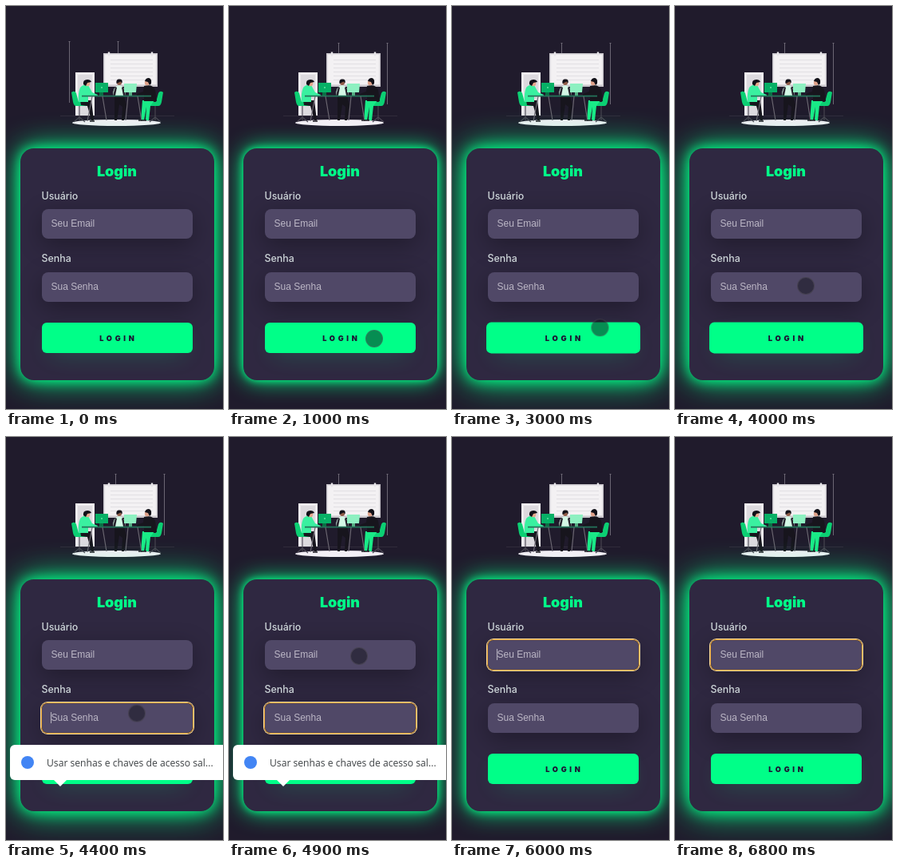
These frames come from a looping animation (272 px wide and 504 px high, 6900 ms). An HTML page:

```html
<!DOCTYPE html>
<html lang="pt-BR">
<head>
<meta charset="utf-8">
<title>Login</title>
<style>
:root { --green: #00ff88; --loop: 6900ms infinite; }
html, body { margin: 0; width: 100%; height: 100%; overflow: hidden; background: #201b2c; }
.stage { position: relative; width: 272px; height: 504px; overflow: hidden; }
.stage > * { position: absolute; box-sizing: border-box; }
svg { left: 0; top: 0; width: 272px; height: 504px; }

.card {
  left: 18px; top: 178px; width: 243px; height: 290px; border-radius: 17px;
  background: #2f2841; animation: glow var(--loop) ease-in-out;
}
.field {
  left: 45px; width: 189px; height: 37px; border-radius: 8px;
  background: #504867; box-shadow: 0 8px 30px #00000050;
}
.user { top: 254px; }
.pass { top: 332.5px; }
.ring {
  left: 44px; width: 191px; height: 39px; border-radius: 8px;
  border: 1.8px solid #e3a033; box-shadow: 0 0 0 1px #fbdc9c; opacity: 0;
}
.caret { left: 56px; width: 1px; height: 14px; background: #b9b5c2; opacity: 0; }
.user-ring { top: 253px; animation: user-focus var(--loop) step-end; }
.pass-ring { top: 331.5px; animation: pass-focus var(--loop) step-end; }
.user-caret { top: 265px; animation: user-blink var(--loop) step-end; }
.pass-caret { top: 344px; animation: pass-blink var(--loop) step-end; }

.btn {
  left: 45px; top: 396px; width: 189px; height: 38px; border-radius: 6px;
  padding-left: 2.6px; background: var(--green); color: #1d1233;
  box-shadow: 0 10px 30px -12px #00ff8052;
  font: 900 9.2px/39.5px Inter, sans-serif; letter-spacing: 3.7px; text-align: center;
  animation: hover var(--loop) linear;
}
.labels { font: 500 12.4px Inter, sans-serif; fill: #e6f0f0de; }
.labels .title { font-size: 18px; font-weight: 900; fill: var(--green); }
.labels .hint { font: 12px "Liberation Sans", Arial, sans-serif; fill: #bcb7c6; }

.popup {
  left: 5px; top: 385px; width: 280px; height: 44px; border-radius: 6px;
  padding-left: 46px; background: #fff; color: #3c4043; white-space: nowrap;
  font: 12.15px/45px "Open Sans", sans-serif;
  opacity: 0; animation: popup var(--loop) step-end;
}
.popup::before, .popup::after { content: ""; position: absolute; }
.popup::before { left: 14px; top: 14px; width: 16px; height: 16px; border-radius: 50%; background: #4285f4; }
.popup::after { left: 55px; top: 43.5px; border: 8px solid transparent; border-top-color: #fff; border-bottom: 0; }

.touch {
  left: -11px; top: -11px; width: 22px; height: 22px; border-radius: 50%;
  background: #0e0e1678; border: 1.2px solid #6a667060; opacity: 0;
  animation: move var(--loop) ease-in-out, present var(--loop) step-end;
}
.poles { animation: slide var(--loop) cubic-bezier(.3, .1, .2, 1); }

@keyframes glow {
  0%, 100% { box-shadow: 0 0 15px var(--green), 0 0 38px var(--green); }
  5.1%, 23.9%, 42.8%, 61.6%, 80.4%, 99.3% { box-shadow: 0 0 18px var(--green), 0 0 44px var(--green); }
  14.5%, 33.3%, 52.2%, 71%, 89.9% { box-shadow: 0 0 10px var(--green), 0 0 28px var(--green); }
}
@keyframes slide {
  0%, 8% { transform: translate(-58px, -2px); }
  14%, 100% { transform: none; }
}
@keyframes move {
  0%, 8.7% { transform: translate(284px, 384px); }
  14.49% { transform: translate(182px, 416px); }
  21.74%, 38.4% { transform: translate(194px, 423px); }
  52.17%, 62.5% { transform: translate(164px, 350px); }
  70%, 100% { transform: translate(163px, 274px); }
}
@keyframes present { 0% { opacity: 0; } 8.7% { opacity: 1; } 76% { opacity: 0; } }
@keyframes hover {
  0%, 29.3% { transform: none; }
  33.3%, 60.2% { transform: scale(1.021); }
  63.5%, 100% { transform: none; }
}
@keyframes pass-focus { 0% { opacity: 0; } 60.9% { opacity: 1; } 73.2% { opacity: 0; } }
@keyframes pass-blink { 0% { opacity: 0; } 60.9% { opacity: 1; } 68.1% { opacity: 0; } }
@keyframes popup { 0% { opacity: 0; } 62.3% { opacity: 1; } 73.2% { opacity: 0; } }
@keyframes user-focus { 0% { opacity: 0; } 73.2%, 100% { opacity: 1; } }
@keyframes user-blink {
  0% { opacity: 0; } 73.2% { opacity: 1; } 80.4% { opacity: 0; }
  86.9% { opacity: 1; } 94.9% { opacity: 0; }
}
</style>
</head>
<body>
<div class="stage">
  <svg viewBox="0 0 272 504" fill="none">
    <path d="M68 137.5H211" stroke="#393343" stroke-width=".7"/>
    <ellipse cx="138.5" cy="146" rx="55.5" ry="4" fill="#f4eff6"/>
    <g class="poles" stroke="#74707c" stroke-width=".9">
      <path d="M137.5 46V123M198.5 46V123"/>
      <path d="M136.5 46.5h2M197.5 46.5h2"/>
    </g>
    <!-- door and whiteboard -->
    <path d="M87 83h24v54H87z" fill="#efecef"/>
    <path d="M90 86h18v51H90z" fill="#dddadf"/>
    <path d="M122 59h68v42h-68z" fill="#c9c6cc"/>
    <path d="M123.5 60.5h65v38h-65z" fill="#f3f1f3"/>
    <path d="M131 67.500h53M131 72.500h53M131 77.500h53M131 82.500h53M131 87.500h53M131 92.500h53" stroke="#dedbe0" stroke-width=".8"/>
    <path d="M129 57.5v5M183 57.5v5" stroke="#e8e6ea" stroke-width="2.4"/>
    <!-- chairs -->
    <g fill="#0ccf73">
      <path d="M82 108q4-3 6 1l3 11h11q2 3-1 5H88q-3 0-4-5z"/>
      <path d="M197 108q-4-3-6 1l-3 11h-11q-2 3 1 5h13q3 0 4-5z"/>
    </g>
    <path d="M92 125v18M92 139l-7 6M92 139l7 6M187 125v18M187 139l-7 6M187 139l7 6" stroke="#4b4753" stroke-width="1.1"/>
    <!-- left person -->
    <path d="M93 118h14l3 25h-3l-5-18-8-1z" fill="#17151d"/>
    <path d="M93 102q4-5 10-3l5 9 7 3-1 2-11-1v8H91q-1-11 2-18z" fill="#3af0a0"/>
    <circle cx="102" cy="97" r="3.3" fill="#e7a88d"/>
    <path d="M97 98q-1-6 5-6 4 0 5 3l-5 1-2 4z" fill="#111018"/>
    <!-- middle person -->
    <path d="M136 113h12l3 10-3 20h-3l1-17-4-3-3 20h-3z" fill="#17151d"/>
    <path d="M134 112q0-12 8-13 7 1 8 13z" fill="#d3f7e5"/>
    <path d="M134 112l3-11 2 1-2 10zM150 112l-3-11-2 1 2 10z" fill="#26222d"/>
    <circle cx="142" cy="96" r="3" fill="#8f5b47"/>
    <path d="M138.500 97q-1-6 4-5.500 4 0 3 5l-2-2z" fill="#111018"/>
    <!-- right person -->
    <path d="M171 118h15l-5 7-2 18h-4l1-17-3 17h-4z" fill="#19ea87"/>
    <path d="M173 100q11-3 14 5l2 14h-16v-8l-9 1v-2l8-3z" fill="#17151d"/>
    <circle cx="177" cy="96" r="3.200" fill="#dfa189"/>
    <path d="M174 94q1-4 5-4 4 1 3 7l-2 2-2-4z" fill="#111018"/>
    <!-- screens and table -->
    <path d="M112 96h16v12h-16z" fill="#07b066"/>
    <path d="M117 108h5v4h-5z" fill="#0a7044"/>
    <path d="M148 97h16l-1 11h-15z" fill="#8df0c1"/>
    <path d="M154 108h4v4h-4z" fill="#58ae84"/>
    <circle cx="120" cy="102" r="1" fill="#63e5a5"/>
    <path d="M95 112.700H182" stroke="#24735a" stroke-width="1.800"/>
    <path d="M108 113l-6 31M121 113l5 30M153 113l-3 30M165 113l5 31" stroke="#6a6670" stroke-width="1.200"/>
    <path d="M105 144h6M176 143h-6M166 143h6" stroke="#17151d" stroke-width="1.500"/>
  </svg>

  <div class="card"></div>
  <div class="field user"></div>
  <div class="field pass"></div>
  <div class="btn">LOGIN</div>

  <svg class="labels" viewBox="0 0 272 504">
    <text class="title" x="139" y="213" text-anchor="middle">Login</text>
    <text x="44.500" y="241.500">Usuário</text>
    <text x="44.500" y="320">Senha</text>
    <text class="hint" x="56.500" y="276">Seu Email</text>
    <text class="hint" x="56.500" y="355">Sua Senha</text>
  </svg>

  <div class="ring user-ring"></div>
  <div class="ring pass-ring"></div>
  <div class="caret user-caret"></div>
  <div class="caret pass-caret"></div>
  <div class="popup">Usar senhas e chaves de acesso sal...</div>
  <div class="touch"></div>
</div>
</body>
</html>
```
